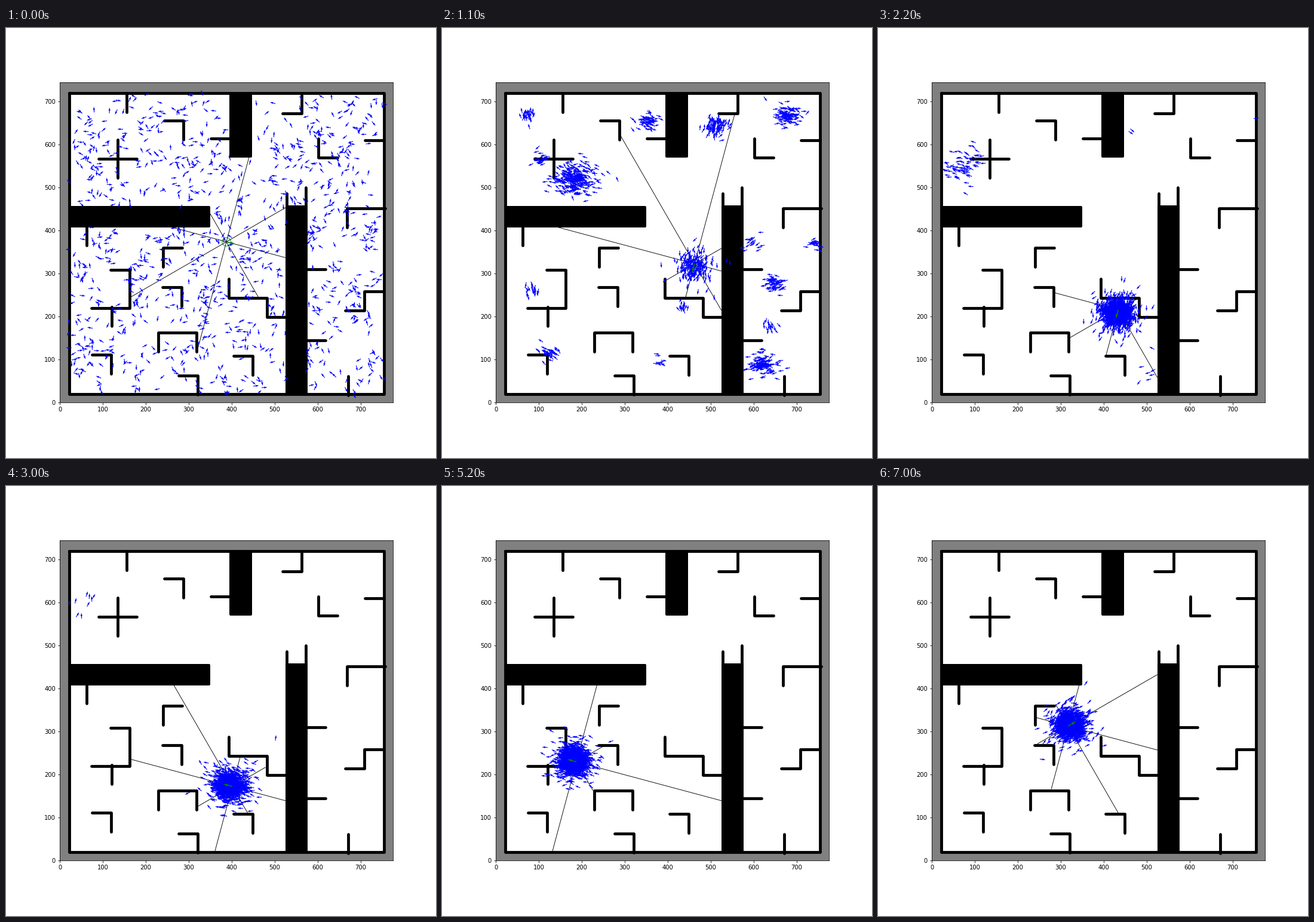
Write a matplotlib script that moves like this. It is 720x720 px and loops after 7100 ms.

```python
import numpy as np
import matplotlib.pyplot as plt
from matplotlib.animation import FuncAnimation
from matplotlib.patches import Circle, Rectangle

FRAMES = 71
STEP = 7.24            # robot travel per frame, in pixels
ARM = 32               # length of one wall step
HALF = 2.4             # half of the wall thickness
LEFT, RIGHT, TOP, BOTTOM = 90, 648, 90.8, 627.2
rng = np.random.default_rng(12)

# ---- map, in stage pixels -------------------------------------------------
ROOM = (105, 108, 632.5, 612.5)
BLOCKS = [(104, 297, 341, 333), (373, 108, 411.5, 216.5), (467, 296.5, 504, 613)]
# start of each thin wall and its steps: Up, Down, Left, Right
WALLS = [(201, 108, "D"), (264, 154.5, "RD"), (186, 186, "DD"), (154, 218.5, "RR"),
         (342, 184.5, "R"), (462, 142, "RU"), (522.5, 184, "DR"), (600, 187, "R"),
         (570.5, 333, "URR"), (134.5, 331, "D"), (174.5, 404, "RDDLL"),
         (176, 466.5, "D"), (262.5, 399, "UR"), (261, 433.5, "RD"),
         (254.5, 541, "URRD"), (143.5, 546.5, "RD"), (288.5, 581, "RD"),
         (372, 419.5, "DRRDR"), (380, 548.5, "RD"), (502, 403, "R"),
         (502, 522, "R"), (567, 472.5, "RUR"), (572, 582, "D"),
         (469.5, 308, "U"), (501.5, 298, "U")]
MOVES = {"U": (0, -ARM), "D": (0, ARM), "L": (-ARM, 0), "R": (ARM, 0)}

# ---- wrong guesses when the robot first turns ------------------------------
# lasting groups: x, y, heading, count
LASTING = [(245, 259, 255, 280), (553, 143, 82, 110), (450, 190, 165, 95),
           (320, 148, 75, 60), (580, 425, 280, 60), (562, 560, 280, 120),
           (148, 172, 190, 30)]
# fading groups: x, y, count
FADING = [(200, 560, 60), (145, 412, 35), (340, 555, 20), (408, 492, 18),
          (597, 360, 35), (540, 350, 38), (540, 475, 35), (190, 210, 40)]
NEAR_ROBOT = 85


def robot_path():
    """Heading (degrees) and place (complex, y down) for every frame."""
    k = np.arange(FRAMES)
    head = np.select([k < 8, k < 28, k < 54], [-15, -105, -195], -330)
    pace = np.where(k < 8, 8.8, STEP)
    pace[[0, 8, 28, 54]] = 0        # a turn takes one frame on the spot
    return head, 368.5 + 357.5j + np.cumsum(pace * np.exp(-1j * np.radians(head)))


HEAD, PLACE = robot_path()


def carry(start, heading, anchor, k):
    """Repeat the robot's motion from another place and heading."""
    turn = np.exp(-1j * np.radians(heading - HEAD[anchor]))
    return start + (PLACE[k] - PLACE[anchor]) * turn, heading + HEAD[k] - HEAD[anchor]


def drift(n, keep=0.75):
    """Unit noise that wanders slowly from frame to frame."""
    out = rng.normal(size=(FRAMES, n))
    for k in range(1, FRAMES):
        out[k] = keep * out[k - 1] + np.sqrt(1 - keep ** 2) * out[k]
    return out


def inside(z, box):
    x0, y0, x1, y1 = box
    return (z.real > x0) & (z.real < x1) & (z.imag > y0) & (z.imag < y1)


def off_floor(z):
    return ~inside(z, ROOM) | np.any([inside(z, b) for b in BLOCKS], axis=0)


def scatter(n):
    """Loose clumps all over the open floor."""
    seeds = rng.uniform(109, 630, 700) + 1j * rng.uniform(112, 609, 700)
    z = rng.choice(seeds, 3 * n) + rng.normal(0, 7, 3 * n) + 1j * rng.normal(0, 7, 3 * n)
    return z[~off_floor(z)][:n]


def make_groups():
    """One row per guess: x, y, heading, count of its group, time of leaving."""
    rows = []
    for i, (x, y, head, count) in enumerate(LASTING):
        leave = 16 + rng.exponential(4 if i == 0 else 2.2, count)
        rows += [(x, y, head, count, t) for t in leave]
    for x, y, count in FADING:
        head = rng.uniform(0, 360)
        rows += [(x, y, head, count, t) for t in rng.uniform(8, 15, count)]
    spot = PLACE[7]
    rows += [(spot.real, spot.imag - 25, HEAD[7], NEAR_ROBOT, 8)] * NEAR_ROBOT
    return np.array(rows).T


gx, gy, ghead, gcount, leave = make_groups()
N = len(gx)
home = gx + 1j * gy
spread = 1.4 * np.sqrt(gcount)
gather = rng.integers(1, 8, N)      # when each loose guess joins its group
loose, loose_head = scatter(N), rng.uniform(0, 360, N)
wide = np.where(rng.random(N) < 0.13, 1.6, 0.9)
dx, dy, dturn = drift(N) * wide, drift(N) * wide, drift(N) * 20


def guesses(k):
    """Places and headings (radians) of all guesses."""
    z, head = carry(loose, loose_head, 0, k)
    group_z, group_head = carry(home, ghead, 7, k)
    size = spread * (1 if k < 8 else 0.8)
    group_z = group_z + size * (dx[k] + 0.75j * dy[k])
    cloud_z = PLACE[k] + 14 * dx[k] + 13j * dy[k]

    joined = k >= gather
    z, head = np.where(joined, group_z, z), np.where(joined, group_head, head)
    found = (k >= np.minimum(leave, 33)) | (off_floor(z) & (k > 0))
    z, head = np.where(found, cloud_z, z), np.where(found, HEAD[k], head)
    return z, np.radians(head + dturn[k])


# ---- drawing --------------------------------------------------------------
plt.rcParams.update({"font.family": "DejaVu Sans", "font.size": 10})
fig = plt.figure(figsize=(10, 10), dpi=72, facecolor="white")
ax = fig.add_axes([LEFT / 720, 1 - BOTTOM / 720,
                   (RIGHT - LEFT) / 720, (BOTTOM - TOP) / 720])
# whole coordinates are pixel centres
ax.set(xlim=(LEFT - 0.5, RIGHT - 0.5), ylim=(BOTTOM - 0.5, TOP - 0.5),
       facecolor="gray")
ticks = np.arange(8)
names = [str(100 * t) for t in ticks]
ax.set_xticks(LEFT - 0.5 + 72 * ticks, names)
ax.set_yticks(BOTTOM - 0.5 - 72 * ticks, names)

boxes = list(BLOCKS)


def wall(points):
    ax.plot(*zip(*points), color="black", lw=2 * HALF, zorder=1.5,
            solid_capstyle="round", solid_joinstyle="round")
    for (xa, ya), (xb, yb) in zip(points, points[1:]):
        boxes.append((min(xa, xb) - HALF, min(ya, yb) - HALF,
                      max(xa, xb) + HALF, max(ya, yb) + HALF))


def rect(box, inset=0, **style):
    x0, y0, x1, y1 = box
    ax.add_patch(Rectangle((x0 + inset, y0 + inset), x1 - x0 - 2 * inset,
                           y1 - y0 - 2 * inset, **style))


x0, y0, x1, y1 = ROOM
rect(ROOM, fc="white", ec="none", zorder=1)
wall([(x0, y0), (x1, y0), (x1, y1), (x0, y1), (x0, y0)])
for block in BLOCKS:
    rect(block, 2, fc="black", ec="black", lw=4, joinstyle="round", zorder=1.5)
for x, y, steps in WALLS:
    wall(np.cumsum([(x, y)] + [MOVES[s] for s in steps], axis=0))
boxes = np.array(boxes)


def ray_end(z, angle):
    """First wall met from z in the given direction."""
    way = np.exp(-1j * np.radians(angle))
    ta, tb = (boxes[:, 0] - z.real) / way.real, (boxes[:, 2] - z.real) / way.real
    tc, td = (boxes[:, 1] - z.imag) / way.imag, (boxes[:, 3] - z.imag) / way.imag
    near = np.maximum(np.minimum(ta, tb), np.minimum(tc, td))
    far = np.minimum(np.maximum(ta, tb), np.maximum(tc, td))
    return z + way * near[(near <= far) & (near > 0)].min()


def arrows(n, color, width, zorder):
    zero = np.zeros(n)
    return ax.quiver(zero, zero, zero, zero, color=color, units="inches",
                     width=width / 72, scale_units="inches", scale=72,
                     angles="uv", zorder=zorder)


ring = ax.add_patch(Circle((0, 0), 7.2, fill=False, ec="#10b050", lw=1.1, zorder=2))
rays = [ax.plot([], [], color="black", lw=0.9, zorder=2.1)[0] for _ in range(8)]
cloud = arrows(N, "blue", 1.1, 3)
robot = arrows(1, "green", 1.6, 4)


def aim(quiver, z, angle, length):
    quiver.set_offsets(np.column_stack([z.real, z.imag]))
    quiver.set_UVC(length * np.cos(angle), length * np.sin(angle))


def draw(k):
    here = PLACE[k]
    ring.center = here.real, here.imag
    for i, ray in enumerate(rays):
        end = ray_end(here, HEAD[k] + 45 * i)
        ray.set_data([here.real, end.real], [here.imag, end.imag])
    aim(cloud, *guesses(k), 9.5)
    aim(robot, PLACE[k:k + 1], np.radians(HEAD[k:k + 1]), 15.5)
    return [ring, *rays, cloud, robot]


anim = FuncAnimation(fig, draw, frames=FRAMES, interval=100, repeat=True)
plt.show()
```
